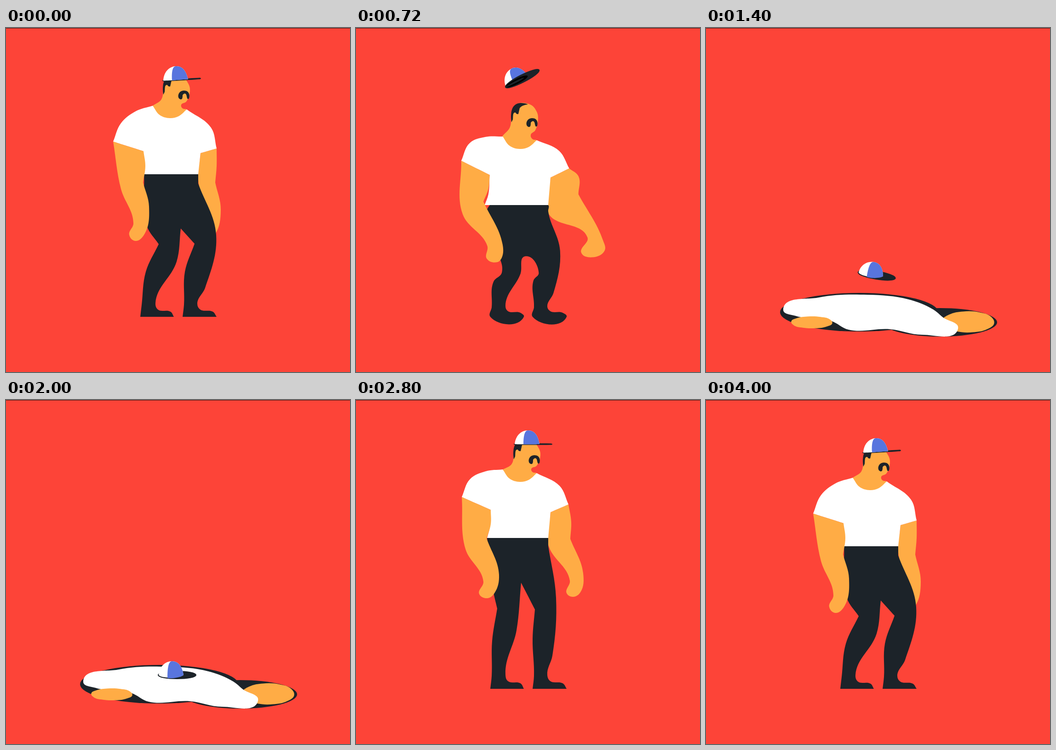
These frames come from a looping animation (748 px wide and 748 px high, 4.36 s). An HTML page with a canvas:

```html
<!DOCTYPE html>
<html lang="en">
<head>
<meta charset="utf-8">
<title>Melting man</title>
<style>
html, body { margin: 0; width: 100%; height: 100%; overflow: hidden; background: #fd4438; }
canvas { display: block; }
</style>
</head>
<body>
<canvas id="stage" width="748" height="748"></canvas>
<script>
const ctx = document.getElementById('stage').getContext('2d');
const LOOP = 4360, STEP = 40, GROUND = 628, HEM = 318;
const RED = '#fd4438', DARK = '#1c2329', SKIN = '#ffac45', BLUE = '#5875de', WHITE = '#fff';

// Each pose of the body is a handful of rig settings:
// drop of the torso, lift of the sleeves, [swing, lean] of the arms, straightness of the legs.
const RIG = {
  rest:    { drop: 0,   lift: 0,     near: [0, 0],      far: [0, 0],    straight: 0,   melt: 0, nod: [0, 0] },
  tall:    { drop: -18, lift: 1,     near: [1, 0],      far: [1, 0],    straight: 1,   melt: 0, nod: [1, 2] },
  stretch: { drop: -26, lift: 1.1,   near: [1, 0],      far: [1.65, 0], straight: 1,   melt: 0, nod: [1, 2] },
  sag:     { drop: 67,  lift: 1.4,   near: [1.5, 0.17], far: [2.6, 0],  straight: 0.6, melt: 1, nod: [-4, -7] },
  crouch:  { drop: 218, lift: -0.65, near: [0, -0.12],  far: [0, 0.35], straight: 0.3, melt: 0, nod: [1, 5] }
};
const TIMELINE = [
  [0, 'rest'], [480, 'stretch'], [720, 'sag'], [1040, 'splash'], [1280, 'flat'], [2080, 'flat'],
  [2480, 'crouch'], [2800, 'tall'], [2900, 'stretch'], [3450, 'rest'], [LOOP, 'rest']
];

// Points at rest: x, y, and how far a lift, swing or straightening moves them.
const SHIRT = [
  [319, 169, 0, 0], [393, 177, 0, 0], [446, 217, -3, -12], [458, 262, 4, -17], [423, 272, 0, -10], [418, HEM, 0, 0],
  [298, HEM, -13, 0], [299, 295, -8, 0], [299, 268, -6, -11], [233, 247, -3, -18], [250, 207, -2, -17], [282, 181, 0, -8]
];
const NEAR_ARM = [
  [233, 247, -3, -18], [299, 268, -6, -11], [303, 300, -10, -12], [298, 336, -14, -17], [311, 388, 0, 10],
  [300, 450, 1, -12], [281, 463, 5, -14], [268, 450, 0, -10], [277, 425, 0, -12], [250, 350, -12, -8]
];
const FAR_ARM = [
  [423, 272, 0, -10], [458, 262, 4, -17], [458, 300, 10, -17], [455, 336, 11, -16], [467, 395, 27, 0],
  [455, 448, 33, -12], [446, 455, 26, -9], [438, 448, 20, -10], [441, 425, 24, -14], [418, 330, 0, 2]
];
const LEGS = [
  [300, HEM, -15, 0], [418, HEM, 0, 0], [418, 338, 0, -4], [457, 450, -22, -9], [433, 565, -6, -5], [416, 600, 0, 0],
  [422, 612, 0, 0], [450, 617, 0, 0], [458, 628, 0, 0], [384, 628, 0, 0], [387, 602, 0, 0], [389, 530, -5, -5],
  [410, 469, -21, -4], [380, 436, -21, -26], [371, 508, -22, 0], [325, 598, 0, 0], [330, 612, 0, 0], [358, 617, 0, 0],
  [365, 628, 0, 0], [292, 628, 0, 0], [295, 602, 0, 0], [304, 530, -8, 0], [332, 470, -25, -7], [306, 430, -8, -5]
];
const HEAD = [
  [319, 169], [338, 155], [343, 120], [352, 106], [384, 107], [397, 122], [400, 136],
  [392, 160], [381, 167], [383, 174], [393, 177], [375, 192], [356, 196], [334, 189]
];
const JOINTS = [12, 13, 22];   // knees and crotch, which droop while melting

const ring = (cx, cy, rx, ry, count, start) => Array.from({ length: count }, (_, i) => {
  const angle = (start + i / count) * 2 * Math.PI;
  return [cx + rx * Math.cos(angle), cy + ry * Math.sin(angle)];
});

// What is left of an arm: a rounded post standing on a flat foot.
const stump = (x, top, half, left, right, ground, thick) => [
  [x - half, top + 14], [x, top], [x + half, top + 14], [x + half - 1, ground - 24], [x + half + 18, ground - thick],
  [right, ground], [(left + right) / 2, ground + thick], [left, ground], [x - half + 1, ground - 12], [x - half + 3, (top + ground) / 2]
];

const buildShirt = rig => SHIRT.map(([x, y, dx, dy]) => [x + dx * rig.lift, y + dy * rig.lift + rig.drop]);

const buildArm = (base, rig, [swing, lean]) => base.map(([x, y, dx, dy], i) => {
  const amount = i < 2 ? rig.lift : swing;
  const below = Math.max(0, y + dy * amount - 336);
  const low = y + dy * amount + rig.drop;
  return [x + dx * amount + lean * below * below / 100, Math.min(low, 560 + (low - 560) * 0.62)];
});

const buildLegs = rig => {
  const scale = (GROUND - HEM - rig.drop) / (GROUND - HEM);
  return LEGS.map(([x, y, dx, dy], i) => [
    x + dx * rig.straight,
    GROUND - (GROUND - y - dy * rig.straight) * scale + (JOINTS.includes(i) ? 40 * scale * rig.melt : 0)
  ]);
};

const buildHead = rig => HEAD.map(([x, y]) => {
  const weight = Math.min(1, Math.max(0, (172 - y) / 20));
  return [x + rig.nod[0] * weight, y + rig.drop + rig.nod[1] * weight];
});

const sunkenLegs = buildLegs({ drop: 294, straight: 0.5, melt: 1 });

const parts = {
  shirt: {
    color: WHITE, corners: [0, 1, 3, 4, 5, 6, 8, 9], build: buildShirt,
    splash: [[345, 467], [361, 438], [385, 505], [372, 568], [438, 630], [390, 643],
      [300, 643], [229, 618], [299, 560], [296, 486], [316, 513], [319, 447]],
    flat: [[352, 580], [440, 590], [494, 612], [515, 629], [548, 654], [470, 667],
      [400, 655], [310, 656], [272, 637], [195, 626], [168, 612], [245, 586]]
  },
  nearArm: {
    color: SKIN, corners: [0, 1, 3], build: rig => buildArm(NEAR_ARM, rig, rig.near),
    splash: stump(246, 567, 14, 224, 287, 636, 6), flat: ring(230, 640, 45, 13, 10, 0.62)
  },
  farArm: {
    color: SKIN, corners: [0, 1, 3], build: rig => buildArm(FAR_ARM, rig, rig.far),
    splash: stump(450, 540, 13, 434, 563, 639, 14), flat: ring(570, 639, 57, 23, 10, 0.62)
  },
  legs: {
    color: DARK, corners: [0, 1, 2, 8, 9, 12, 13, 18, 19, 22], build: buildLegs,
    splash: sunkenLegs, flat: sunkenLegs
  },
  head: {
    color: SKIN, corners: [0, 10], build: buildHead,
    splash: ring(355, 445, 17, 21, HEAD.length, 0.4), flat: ring(360, 598, 1, 1, HEAD.length, 0.4)
  }
};

// The last value of a key tells how soft the corners are.
for (const part of Object.values(parts)) {
  part.keys = TIMELINE.map(([time, pose]) => {
    const rig = RIG[pose];
    const points = rig ? part.build(rig) : part[pose];
    const softness = !rig ? 1 : part === parts.legs ? rig.melt : 0;
    return [time, [...points.flat(), softness]];
  });
}

// dx, dy, scale
const faceKeys = TIMELINE.map(([time, pose]) => {
  const rig = RIG[pose];
  return [time, rig ? [rig.nod[0], rig.nod[1] + rig.drop, 1] : [-30, pose === 'flat' ? 452 : 310, 0]];
});

// x, y, degrees, crown height, brim half depth
const hatKeys = [
  [0, [369, 113, -3.5, 1, 0.3]], [480, [372, 88, 0, 1, 0.3]], [560, [368, 91, -4, 1, 1]],
  [720, [350, 116, -27, 1, 7.5]], [1040, [347, 227, -114, -0.85, 20]], [1454, [359, 598, -360, 1, 7.5]],
  [2080, [359, 598, -360, 1, 7.5]], [2480, [378, 334, -351.5, 1, 0.3]], [2800, [372, 96, -360, 1, 0.3]],
  [2900, [372, 88, -360, 1, 0.3]], [3450, [369, 113, -363.5, 1, 0.3]], [LOOP, [369, 113, -363.5, 1, 0.3]]
];

// two ellipses: x, y, rx, ry
const puddleKeys = [
  [720, [328, 628, 0, 0, 420, 628, 0, 0]], [1040, [321, 621, 136, 34, 492, 638, 108, 25]],
  [1280, [333, 618, 172, 42, 509, 640, 124, 31]], [2200, [333, 618, 172, 42, 509, 640, 124, 31]],
  [2480, [326, 622, 116, 26, 475, 635, 90, 20]], [2680, [330, 628, 0, 0, 420, 628, 0, 0]]
];

// x, y, radius
const drops = [[310, 383, 15], [347, 408, 9.5], [407, 395, 9], [299, 446, 6.5], [402, 449, 8], [419, 562, 21]];

const moustache = new Path2D('M379 155C371 152 374 136 387 136C399 136 400 147 398 153C395 156 394 154 393 149C392 141 387 141 384 146C384 153 383 156 379 155Z');
const hair = new Path2D('M342 145C340 130 339 104 362 103Q372 103 378 106Q364 108 360 114L357 127Q353 128 351 124C344 122 346 134 345 139Z');

// Monotone cubic interpolation through [time, values] keys.
function sample(keys, t) {
  let k = 0;
  while (k < keys.length - 2 && t >= keys[k + 1][0]) k++;
  const [t0, a] = keys[k], [t1, b] = keys[k + 1];
  const span = t1 - t0, u = (t - t0) / span;
  const slope = (j, i) => keys[j] && keys[j + 1]
    ? (keys[j + 1][1][i] - keys[j][1][i]) / (keys[j + 1][0] - keys[j][0]) : 0;
  const tangent = (p, q) => p * q > 0 ? 2 * p * q / (p + q) : 0;
  return a.map((v, i) => {
    const mid = slope(k, i);
    const m0 = tangent(slope(k - 1, i), mid) * span, m1 = tangent(mid, slope(k + 1, i)) * span;
    const d = b[i] - v;
    return v + u * (m0 + u * (3 * d - 2 * m0 - m1 + u * (m0 + m1 - 2 * d)));
  });
}

const unit = (x, y) => {
  const size = Math.hypot(x, y) || 1;
  return [x / size, y / size];
};

// Smooth closed curve; corners keep the direction of their own side.
function drawPart({ keys, corners, color }, t) {
  const values = sample(keys, t), softness = values.pop(), n = values.length / 2;
  const at = i => [values[2 * ((i + n) % n)], values[2 * ((i + n) % n) + 1]];
  const side = i => unit(at(i + 1)[0] - at(i)[0], at(i + 1)[1] - at(i)[1]);
  const direction = (i, own) => {
    const before = side(i - 1), after = side(i);
    const smooth = unit(before[0] + after[0], before[1] + after[1]);
    const soft = corners.includes(i % n) ? softness : 1;
    return unit(own[0] + (smooth[0] - own[0]) * soft, own[1] + (smooth[1] - own[1]) * soft);
  };
  ctx.beginPath();
  ctx.moveTo(...at(0));
  for (let i = 0; i < n; i++) {
    const a = at(i), b = at(i + 1), own = side(i);
    const reach = Math.hypot(b[0] - a[0], b[1] - a[1]) * 0.36;
    const p = direction(i, own), q = direction(i + 1, own);
    ctx.bezierCurveTo(a[0] + p[0] * reach, a[1] + p[1] * reach, b[0] - q[0] * reach, b[1] - q[1] * reach, ...b);
  }
  ctx.fillStyle = color;
  ctx.fill();
}

function fillEllipse(x, y, rx, ry, color, angle = 0) {
  ctx.beginPath();
  ctx.ellipse(x, y, Math.max(rx, 0), Math.max(ry, 0), angle, 0, 7);
  ctx.fillStyle = color;
  ctx.fill();
}

function drawHead(t) {
  drawPart(parts.head, t);
  const [dx, dy, scale] = sample(faceKeys, t);
  if (scale < 0.02) return;
  ctx.save();
  ctx.translate(370 + dx, 140 + dy);
  ctx.scale(scale, scale);
  ctx.translate(-370, -140);
  ctx.fillStyle = DARK;
  ctx.fill(hair);
  ctx.fill(moustache);
  ctx.restore();
}

function drawDrops(t) {
  if (t < 880 || t > 1400) return;
  const d = t - 1040, grow = Math.min(1, (t - 860) / 140);
  for (const [x, y, radius] of drops) {
    const height = y + 0.3 * d + 0.0009 * d * d;
    if (height < 610) fillEllipse(x, height, radius * grow, radius * 1.6 * grow, WHITE, (x - 352) * 0.004);
  }
}

function drawCrown(height, depth) {
  const top = -30 * height, base = depth * 0.85;
  const dome = (left, lean, apex, corner, color) => {
    ctx.beginPath();
    ctx.moveTo(left, corner);
    ctx.bezierCurveTo(left + lean, top * 0.62, apex, top, 2, top);
    ctx.bezierCurveTo(16, top, 24, top * 0.62, 27, 0);
    ctx.bezierCurveTo(20, base, left + 5, base * 1.3, left, corner);
    ctx.fillStyle = color;
    ctx.fill();
  };
  dome(-27, 2, -13, 0, WHITE);
  dome(-8, 0, -5, base, BLUE);
}

function drawHat(t) {
  let [x, y, degrees, height, depth] = sample(hatKeys, t);
  if (t > 720 && t < 1454) {   // free fall
    const d = t - 720;
    y = 116 + 0.107 * d + 0.00075 * d * d;
  }
  const fromBelow = t > 560 && t < 1300;
  ctx.save();
  ctx.translate(x, y);
  ctx.rotate(degrees * Math.PI / 180);
  if (fromBelow) drawCrown(height, depth);
  fillEllipse(13, 0, 40.5, depth, DARK);
  ctx.strokeStyle = DARK;
  ctx.lineWidth = 3;
  ctx.stroke();
  if (fromBelow) {
    fillEllipse(0, 0, 26, depth * 0.75, '#000');
    fillEllipse(-5, 0, 22, depth * 0.72 * Math.min(1, depth / 20), DARK);
  } else {
    drawCrown(height, depth);
  }
  ctx.restore();
}

function drawPuddle(t) {
  if (t <= 720 || t >= 2680) return;
  const values = sample(puddleKeys, t);
  fillEllipse(...values.slice(0, 4), DARK);
  fillEllipse(...values.slice(4), DARK);
}

function draw(t) {
  const melted = t > 900 && t < 2360;
  ctx.fillStyle = RED;
  ctx.fillRect(0, 0, 748, 748);
  ctx.fillStyle = '#4a1512';
  ctx.fillRect(0, 0, 748, 1);
  drawPuddle(t);
  drawPart(parts.farArm, t);
  drawPart(parts.legs, t);
  if (melted) drawHead(t);
  drawPart(parts.shirt, t);
  drawDrops(t);
  drawPart(parts.nearArm, t);
  if (!melted) drawHead(t);
  drawHat(t);
}

const start = performance.now();
function tick() {
  const t = (performance.now() - start) % LOOP;
  draw(Math.floor(t / STEP) * STEP);
  requestAnimationFrame(tick);
}
tick();
</script>
</body>
</html>
```
